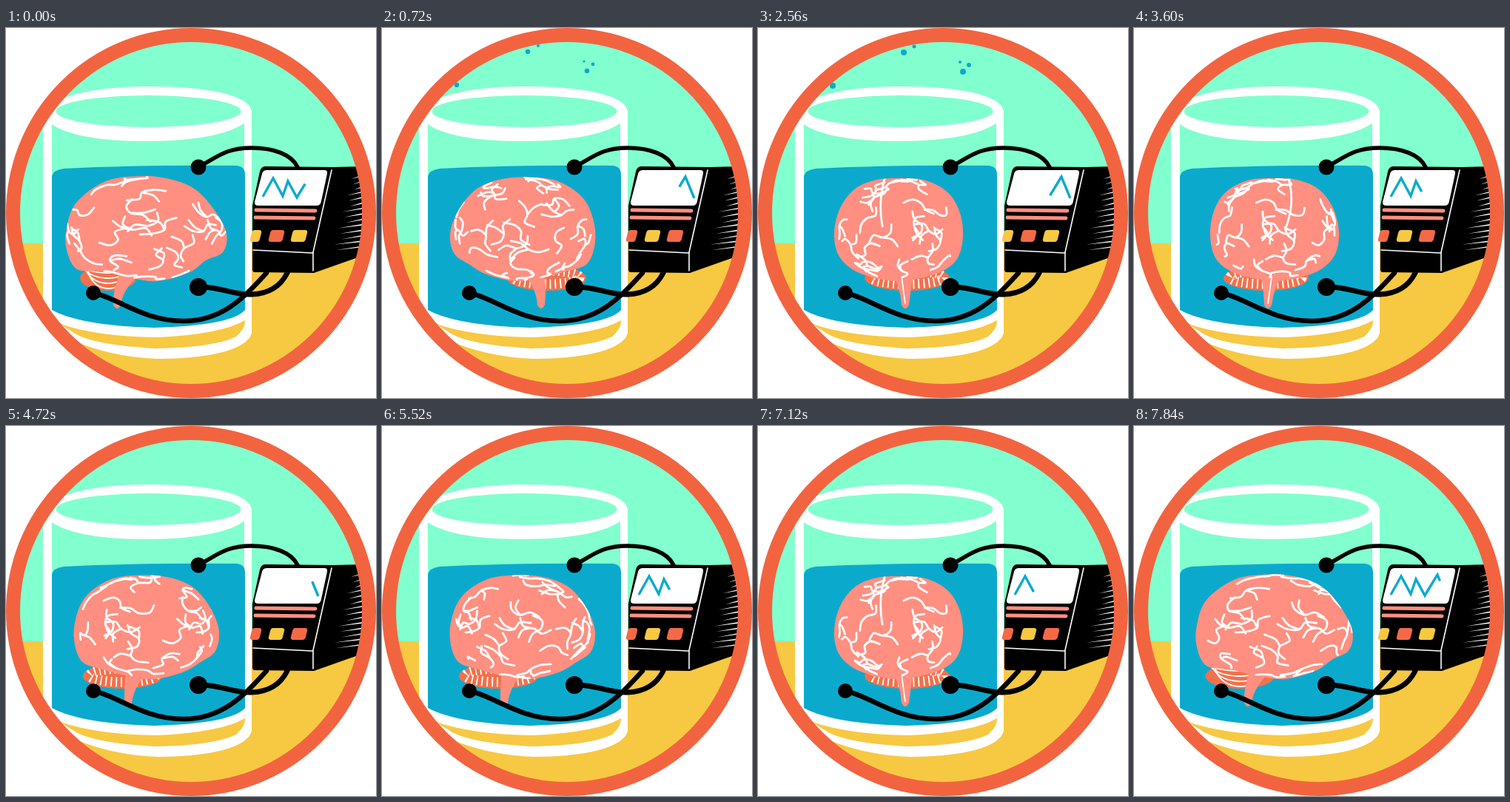
Recreate the animation shown at these times as an HTML page with a canvas. Size 500 by 500 pixels, loop 7.92 s.

```html
<!DOCTYPE html>
<html>
<head>
<meta charset="utf-8">
<style>
html, body { margin: 0; width: 100%; height: 100%; overflow: hidden; background: #fff }
canvas { display: block; width: 500px; height: 500px }
</style>
</head>
<body>
<canvas id="stage" width="500" height="500"></canvas>
<script>
const ctx = document.getElementById('stage').getContext('2d');
const STEP = 80, STEPS = 99, CYCLE = 24, POSES = 14;
const MINT = '#82ffcf', YELLOW = '#f7c842', WATER = '#0baacd', RING = '#f26440',
      PINK = '#ff8f80', RUST = '#f2714c', RED = '#f46a47', WHITE = '#fff', BLACK = '#000';

const fill = (d, color) => { ctx.fillStyle = color; ctx.fill(new Path2D(d)); };
const stroke = (d, color, width) => {
  ctx.strokeStyle = color; ctx.lineWidth = width; ctx.stroke(new Path2D(d));
};
const ellipse = (x, y, rx, ry, color, turn = 0) => {
  ctx.fillStyle = color; ctx.beginPath(); ctx.ellipse(x, y, rx, ry, turn, 0, 7); ctx.fill();
};
const dot = (x, y, r, color) => ellipse(x, y, r, r, color);

let seed = 7;
const random = () => (seed = seed * 16807 % 2147483647) / 2147483647;

// Catmull-Rom curve through points
function curve(p, closed) {
  const m = p.length;
  const at = i => closed ? p[(i + m) % m] : p[Math.max(0, Math.min(m - 1, i))];
  let d = 'M' + p[0];
  for (let i = 0; i < (closed ? m : m - 1); i++) {
    const [a, b, c, e] = [at(i - 1), at(i), at(i + 1), at(i + 2)];
    d += `C${b.map((v, k) => v + (c[k] - a[k]) / 6)} ${c.map((v, k) => v - (e[k] - b[k]) / 6)} ${c}`;
  }
  return d;
}

// The brain is a profile and a round back view, blended by how far it is turned.
const MID = 190;
const profile = [[185, 200], [225, 205], [257, 219], [283, 248], [298, 278], [293, 303], [270, 314], [248, 330],
  [205, 342], [165, 337], [130, 329], [96, 326], [82, 300], [82, 270], [95, 236], [135, 207]];
const halfBack = [[0, 204], [32, 206], [58, 218], [75, 242], [81, 275], [76, 306], [60, 328], [32, 338], [0, 342]];
const back = [...halfBack, ...halfBack.slice(1, -1).reverse().map(([x, y]) => [-x, y])];

// Folds wander over a sphere as [longitude, latitude] paths, some with a side branch.
function wander(lon, lat, heading, count) {
  const path = [], bend = random() < .5 ? 1 : -1;
  for (let i = 0; i < count; i++) {
    path.push([lon, lat]);
    heading += bend * (i % 3 ? .75 : -.9) * (.5 + random());
    lat += .16 * Math.sin(heading);
    lon += .16 * Math.cos(heading) / Math.max(.35, Math.cos(lat));
  }
  return path;
}
const folds = [], FOLDS = 62;
for (let i = 0; i < FOLDS; i++) {
  const heading = random() * 6.3;
  const path = wander(i * 2.4, Math.asin(1 - 2 * (i + .5) / FOLDS), heading, 5);
  folds.push(path);
  if (i % 3) folds.push(wander(...path[2], heading + 1.6, 3));
}

function drawCerebellum(cos, sin) {
  const x = MID - 52 * cos, rx = 38 + 20 * Math.abs(sin);
  ellipse(x, 338, rx, 17, RUST);
  ctx.save();
  ctx.strokeStyle = WHITE;
  ctx.lineWidth = 1.8;
  if (Math.abs(cos) > .8) {
    for (let k = 1; k < 5; k++) {
      ctx.beginPath(); ctx.ellipse(x, 319 + k, rx * (1 - k * .07), 5 + 6 * k, 0, .15, 3); ctx.stroke();
    }
  } else {
    ctx.lineCap = 'butt';
    ctx.lineWidth = 13;
    ctx.setLineDash([1.8, 5]);
    ctx.beginPath(); ctx.ellipse(x, 337, rx - 9, 9, 0, 0, 7); ctx.stroke();
  }
  ctx.restore();
}

function drawBrain(step) {
  const angle = Math.round(step * 98 / STEPS) * 2 * Math.PI / POSES;
  const cos = Math.cos(angle), sin = Math.sin(angle), side = Math.abs(cos), facing = Math.sign(cos);
  const outline = curve(profile.map(([x, y], i) => [
    MID + facing * (back[i][0] + (x - MID - back[i][0]) * side),
    back[i][1] + (y - back[i][1]) * side
  ]), true);
  drawCerebellum(cos, sin);
  const top = MID - 18 * cos, tip = MID - 40 * cos;
  fill(outline, PINK);
  fill(`M${top - 15} 326Q${tip - 6} 350 ${tip - 5} 374Q${tip} 384 ${tip + 5} 374Q${tip + 8} 350 ${top + 17} 326Z`, PINK);
  if (sin > .9) stroke(`M${top} 336L${tip} 372`, WHITE, 1.8);

  ctx.save();
  ctx.clip(new Path2D(outline));
  const width = Math.hypot(81 * sin, 110 * cos);
  let lines = '';
  for (const path of folds) {
    if (path.some(([lon, lat]) => Math.cos(lat) * Math.cos(lon + angle) < .04)) continue;
    lines += curve(path.map(([lon, lat]) =>
      [MID + width * Math.cos(lat) * Math.sin(lon + angle), 271 - 70 * Math.sin(lat)]));
  }
  if (side < .5) {
    const x = MID + 85 * cos;
    lines += `M${x} 204Q${x + 9 * facing} 235 ${x - 3} 268`;
  }
  stroke(lines, WHITE, 2.8);
  ctx.restore();
}

// Bubbles leave the water, slow down and burst into droplets.
const bubbles = [[110, 82, 14, 10, .1], [197, 42, 10.5, 14, 0], [270, 66, 14, 10, -.4]];
const droplets = [[101, 78, 4], [197, 33, 4], [211, 25, 2.5], [277, 59, 4], [285, 50, 3], [273, 46, 2]];
const lowDroplets = [[179, 128, 2.5], [210, 125, 2.5], [217, 129, 2.2]];

function drawBubbles(step) {
  const ph = step % CYCLE;
  if (step >= 4 * CYCLE || ph < 2 || ph > 10) return;
  const rise = Math.min(1, (ph - 1.5) / 4.5);
  const up = y => 198 + (y - 198) * rise;
  const age = ph - 8;
  if (age < 0) for (const [x, y, rx, ry, turn] of bubbles) ellipse(x, up(y), rx, ry, WATER, turn);
  else for (const [x, y, r] of droplets) dot(x, y - age, r * (1 - age * .2), WATER);
  if (ph < 6) ellipse(198, up(120), 10, 9, WATER);
  else if (age < 0) for (const [x, y, r] of lowDroplets) dot(x, y, r, WATER);
}

function drawJar() {
  fill('M50 118H62V380Q110 402 190 404Q290 403 322 382V112H332V412C326 436 270 447 205 447C130 444 70 420 50 390Z', WHITE);
  fill('M62 128H322V200H62Z', MINT);
  fill('M62 200Q64 192 78 190Q180 185 312 186Q323 187 323 198V381Q305 402 200 405Q100 402 62 381Z', WATER);
  fill('M71 399Q120 417 205 418Q290 414 323 395Q324 405 311 417Q280 432 200 433Q120 428 95 414Z', YELLOW);
  // rim
  fill('M52 120C55 92 120 79 192 79C280 79 331 92 332 114C328 138 270 153 190 153C120 153 80 143 62 130Z', WHITE);
  ellipse(192.5, 112.5, 125, 21.5, MINT);
}

function drawWires() {
  stroke('M260 188C285 175 296 162 332 162C362 162 386 171 394 188', BLACK, 5.5);
  stroke('M260 350C290 349 305 361 332 360C358 359 372 347 380 331', BLACK, 7);
  stroke('M118 358C150 364 185 396 240 396C295 396 325 360 352 331', BLACK, 6.5);
  dot(260, 188, 10.5, BLACK);
  dot(260, 350, 12, BLACK);
  dot(118, 358, 10, BLACK);
}

const trace = [[347, 228], [361, 203], [374, 227], [381, 207], [393, 229], [410, 201], [422, 230]];
const traceLength = trace.slice(1).reduce((sum, [x, y], i) => sum + Math.hypot(x - trace[i][0], y - trace[i][1]), 0);

function drawTrace(step) {
  const ph = (step + 12.2) % CYCLE;
  const head = Math.min(1, ph / 16.4);
  const tail = Math.max(0, (ph - 15) / 10) ** .7;
  ctx.save();
  ctx.lineCap = 'butt';
  ctx.lineJoin = 'miter';
  ctx.setLineDash([(head - tail) * traceLength, 999]);
  ctx.lineDashOffset = -tail * traceLength;
  stroke('M' + trace.join('L'), WATER, 3.4);
  ctx.restore();
}

function drawMachine(step) {
  fill('M350 187L442 188L484 187V307L416 331L336 330Q333 330 333 326V240L343 194Q345 187 350 187Z', BLACK);
  stroke('M440 192L415 303V328M334 300L414 304', WHITE, 1.6);
  fill('M353 192H430Q435 192 434 197L426 234Q425 240 420 240H341Q335 240 336 235L346 197Q347 192 353 192Z', WHITE);
  stroke('M338 246L418 247M337 256L416 257', PINK, 5);
  const lit = step % 6 < 3;
  [[331, 10], [356, 16], [386, 17]].forEach(([x, w], i) => {
    fill(`M${x + 5} 273h${w - 4}q4 0 3 4l-2 8q-1 4 -4 4h${4 - w}q-4 0 -3 -4l2 -8q1 -4 4 -4Z`,
      lit === (i !== 1) ? YELLOW : RED);
  });
  for (let i = 0; i < 14; i++) {
    const y = 200 + i * 7.4, x = 466 - i * 1.9 + (i % 3) * 4;
    fill(`M${x} ${y + 4}L484 ${y - 2}v1.9Z`, WHITE);
  }
}

function draw(step) {
  ctx.lineCap = ctx.lineJoin = 'round';
  ctx.fillStyle = WHITE;
  ctx.fillRect(0, 0, 500, 500);
  ctx.save();
  ctx.beginPath(); ctx.arc(250, 250, 240, 0, 7); ctx.clip();
  ctx.fillStyle = MINT; ctx.fillRect(0, 0, 500, 291);
  ctx.fillStyle = YELLOW; ctx.fillRect(0, 291, 500, 209);
  drawJar();
  drawBubbles(step);
  drawBrain(step);
  drawWires();
  drawMachine(step);
  drawTrace(step);
  ctx.restore();
  ctx.strokeStyle = RING;
  ctx.lineWidth = 19;
  ctx.beginPath(); ctx.arc(250, 250, 240.5, 0, 7); ctx.stroke();
}

const start = performance.now();
function tick() {
  draw(Math.floor((performance.now() - start) / STEP) % STEPS);
  requestAnimationFrame(tick);
}
tick();
</script>
</body>
</html>
```
